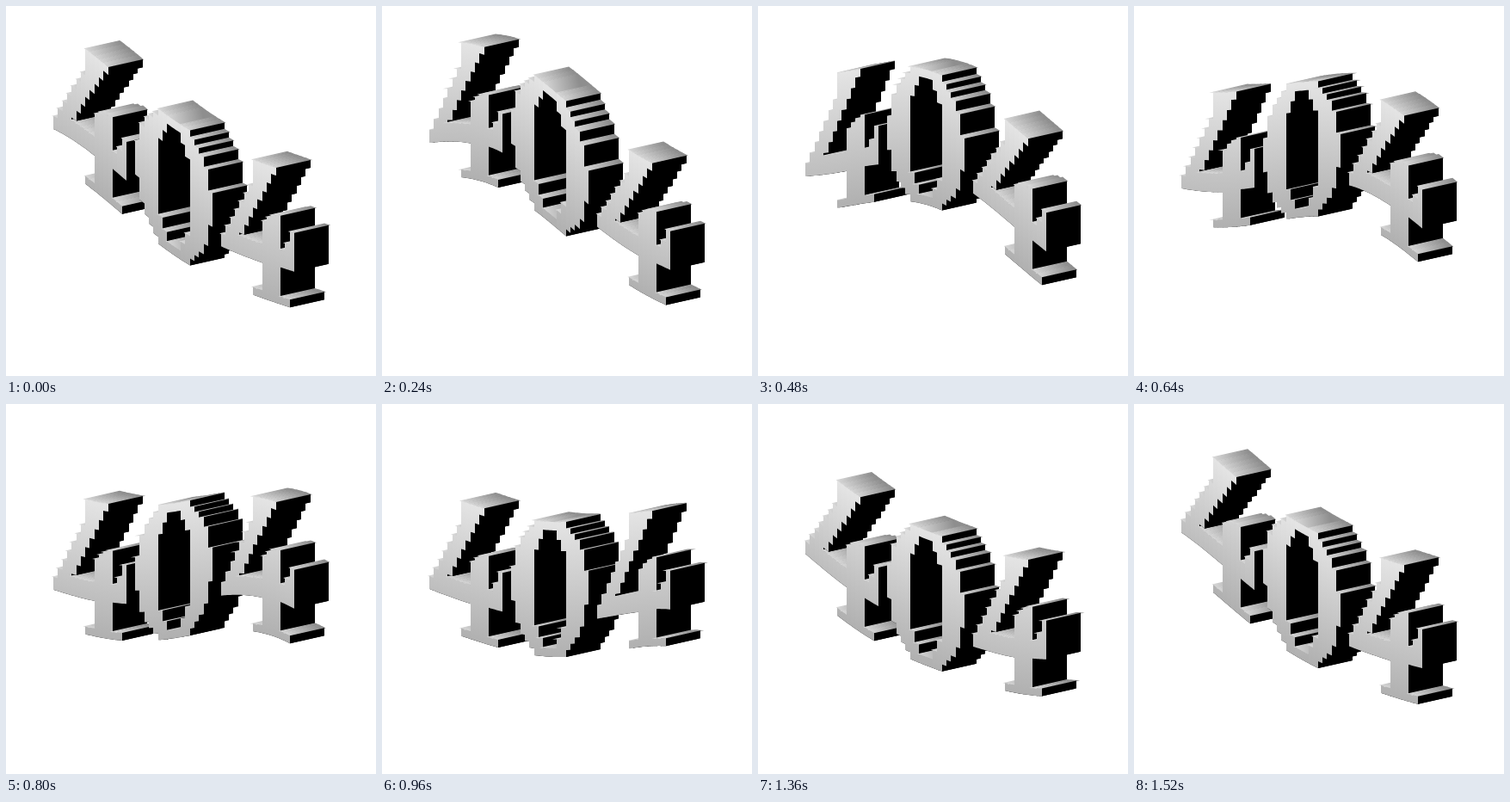
Animation of 430x430 px, one loop 1600 ms. Source, as an HTML page with a canvas:

```html
<!DOCTYPE html>
<html lang="en">
<head>
<meta charset="utf-8">
<title>404</title>
<style>
html, body { margin: 0; width: 100%; height: 100%; overflow: hidden; background: #fff; }
canvas { display: block; width: 430px; height: 430px; }
</style>
</head>
<body>
<canvas id="stage" width="430" height="430"></canvas>
<script>
const ctx = document.getElementById('stage').getContext('2d');
const LOOP = 1600, STEP = 80;
const CELL = 5.3, HEIGHT = 157;
const DEPTH = { x: 40, y: -9 };
const WAVE = 540;

// Each glyph column is a list of solid spans [low, high] above the baseline.
function fourColumn(i) {
  const spans = [];
  const top = i < 7 ? 56 + 11.7 * i : HEIGHT;
  if (i === 7 || i === 8 || i === 13 || i === 14) spans.push([0, 9]);
  if (i < 4) spans.push([41, top]);
  else if (i < 9) spans.push([41, 63]);
  else if (i < 13) spans.push([0, [90, 96, 100, 103][i - 9]]);
  else spans.push([43, [64, 73, 88][i - 13]]);
  if (i >= 4 && i < 12) spans.push([66 + 11.7 * (i - 4), top]);
  return spans;
}

function zeroColumn(i) {
  const edge = Math.min(i, 16 - i);
  const low = [59, 34, 22, 15, 8][edge] || 0;
  const hole = [34, 21, 10, 10][edge - 5];
  return hole === undefined
    ? [[low, HEIGHT - low]]
    : [[0, hole], [HEIGHT - hole, HEIGHT]];
}

// Neighbouring columns with the same spans become one block.
function glyph(left, count, column) {
  const blocks = [];
  let last = '';
  for (let i = 0; i < count; i++) {
    const spans = column(i), key = spans.join();
    const x1 = left + Math.round(CELL * (i + 1));
    if (key === last) blocks[blocks.length - 1].x1 = x1;
    else blocks.push({ x0: left + Math.round(CELL * i), x1, spans });
    last = key;
  }
  return blocks;
}

const blocks = [
  ...glyph(55, 16, fourColumn),
  ...glyph(150, 17, zeroColumn),
  ...glyph(250, 16, fourColumn)
];

function baseline(x, phase) {
  const a = 2 * Math.PI * ((x - 40) / WAVE - phase);
  return 239.5 - 37 * Math.cos(a) - 7 * Math.cos(2 * a) + 0.34 * (x - 92);
}

function fill(points, style, seal = 0) {
  ctx.beginPath();
  for (const [x, y] of points) ctx.lineTo(x, y);
  ctx.closePath();
  ctx.fillStyle = ctx.strokeStyle = style;
  ctx.fill();
  if (seal) {
    ctx.lineWidth = seal;
    ctx.stroke();
  }
}

function ramp(x0, y0, x1, y1, from, to) {
  const g = ctx.createLinearGradient(x0, y0, x1, y1);
  g.addColorStop(0, from);
  g.addColorStop(1, to);
  return g;
}

const back = line => line.map(([x, y]) => [x + DEPTH.x, y + DEPTH.y]).reverse();

function drawBlock({ x0, x1, spans }, phase) {
  const edge = h => {
    const line = [];
    for (let x = x0; x < x1; x += 2) line.push([x, baseline(x, phase) - h]);
    line.push([x1, baseline(x1, phase) - h]);
    return line;
  };
  const mid = baseline((x0 + x1) / 2, phase);
  const face = ramp(0, mid - HEIGHT, 0, mid, '#e4e4e4', '#b0b0b0');
  for (const [low, high] of spans) {
    const top = edge(high), bottom = edge(low);
    const side = [top[top.length - 1], bottom[bottom.length - 1]];
    const y = top[0][1];
    fill([...bottom, ...back(bottom)], '#000');
    // A thin outline seals the joints between neighbouring tops.
    fill([...top, ...back(top)],
      ramp(x0, y, x0 + DEPTH.x, y + DEPTH.y, '#d8d8d8', '#8e8e8e'), 1.2);
    fill([...side, ...back(side)], '#000');
    fill([...top, ...bottom.reverse()], face);
  }
}

function draw(now) {
  const phase = Math.floor(now % LOOP / STEP) * STEP / LOOP;
  ctx.fillStyle = '#fff';
  ctx.fillRect(0, 0, 430, 430);
  for (const block of blocks) drawBlock(block, phase);
}

let start;
function tick(now) {
  if (start === undefined) start = now;
  draw(Math.max(0, now - start));
  requestAnimationFrame(tick);
}
draw(0);
requestAnimationFrame(tick);
</script>
</body>
</html>
```
